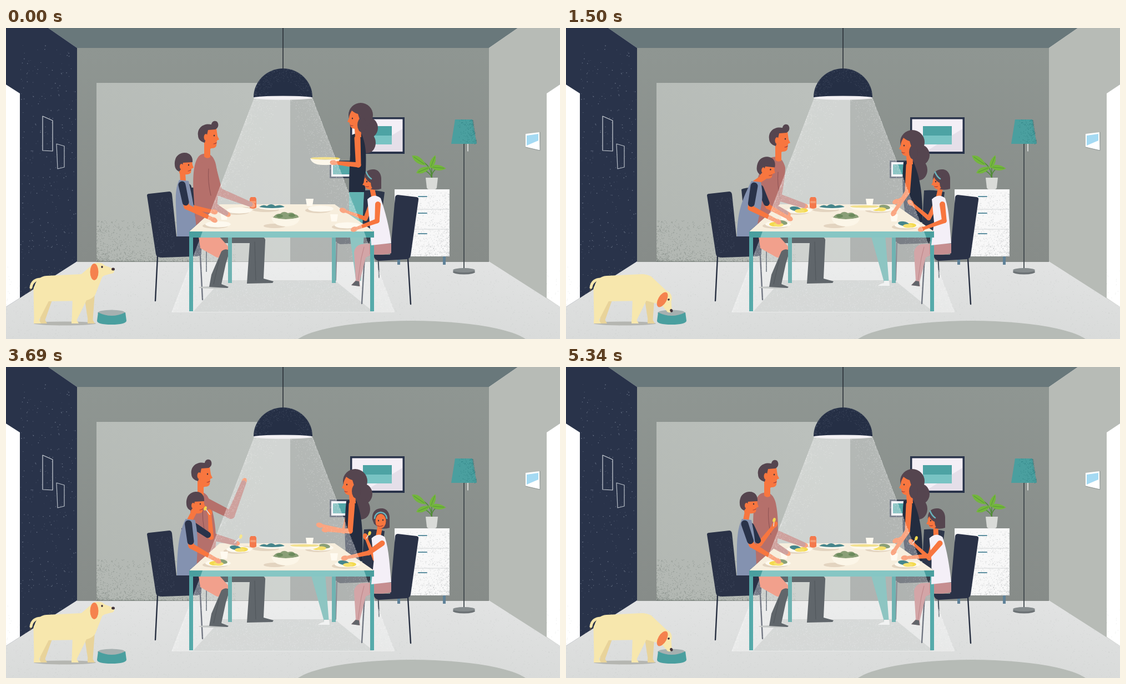
These frames come from a looping animation (998x561 px, 5370 ms). An HTML page with a canvas:

```html
<!DOCTYPE html>
<html lang="en">
<head>
<meta charset="utf-8">
<title>Family dinner</title>
<style>
html, body { margin: 0; width: 100%; height: 100%; overflow: hidden; background: #dcdedd; }
canvas { display: block; width: 998px; height: 561px; }
</style>
</head>
<body>
<canvas id="stage" width="998" height="561"></canvas>
<script>
const W = 998, H = 561, LOOP = 5370, TAU = Math.PI * 2;
const NAVY = '#29334a', TEAL = '#4a9f9f', SKIN = '#f8763f', HAIR = '#55454f', INK = '#40333b';
const CREAM = '#fcf6e8', SHIRT = '#b5706b', GREY = '#60666b', YELLOW = '#f3d94f', DOG = '#f7e7ad';
const stage = document.getElementById('stage').getContext('2d');
let g = stage;

let seed = 7;
const rnd = () => (seed = (seed * 16807) % 2147483647) / 2147483647;

// Drawing helpers
const fill = (d, c) => { g.fillStyle = c; g.fill(new Path2D(d)); };
const line = (d, c, w = 1.5) => {
  g.strokeStyle = c; g.lineWidth = w; g.lineCap = g.lineJoin = 'round';
  g.stroke(new Path2D(d));
};
const rect = (x, y, w, h, c) => { g.fillStyle = c; g.fillRect(x, y, w, h); };
const oval = (x, y, rx, ry, c, rot = 0) => {
  g.fillStyle = c; g.beginPath(); g.ellipse(x, y, rx, ry, rot, 0, TAU); g.fill();
};
const taper = (x1, y1, w1, x2, y2, w2, c) => {
  const a = Math.atan2(y2 - y1, x2 - x1), q = Math.PI / 2;
  g.fillStyle = c; g.beginPath();
  g.arc(x1, y1, w1 / 2, a + q, a + 3 * q);
  g.arc(x2, y2, w2 / 2, a - q, a + q);
  g.fill();
};
const at = (x, y, draw, rot = 0, s = 1) => {
  g.save(); g.translate(x, y); g.rotate(rot); g.scale(s, s); draw(); g.restore();
};
const specks = (n, c, place) => {
  g.fillStyle = c;
  for (let i = 0; i < n; i++) { const [x, y, s = 1] = place(); g.fillRect(x, y, s, s); }
};
const surface = () => {
  const c = document.createElement('canvas');
  c.width = W; c.height = H;
  return c;
};
const paint = (c, draw) => { g = c.getContext('2d'); draw(); g = stage; return c; };
const shade = (x1, y1, x2, y2, a, b) => {
  const s = g.createLinearGradient(x1, y1, x2, y2);
  s.addColorStop(0, a); s.addColorStop(1, b);
  return s;
};

// Motion helpers
const step = (t, a, b) => {
  const p = Math.min(1, Math.max(0, (t - a) / (b - a)));
  return p * p * (3 - 2 * p);
};
const bump = (t, a, b, c, d) => step(t, a, b) - step(t, c, d);
const mix = (p, q, u) => p.map((v, i) => v + (q[i] - v) * u);

function room() {
  rect(0, 0, W, H, shade(0, 421, 0, 561, '#e2e3e3', '#d9dbda'));
  rect(128, 36, 742, 386, shade(0, 36, 0, 421, '#8f9692', '#878c89'));
  fill('M76 0H922L870 36H128Z', '#69787b');
  fill('M0 0H76L128 36V421L0 503Z', NAVY);
  fill('M922 0H998V503L870 421V36Z', '#b7bbb6');
  fill('M0 102L25 118V487L0 503Z', '#fff');
  fill('M998 102L974 118V487L998 503Z', '#fff');
  specks(300, 'rgba(200,210,225,.4)', () => [26 + rnd() * 100, 30 + rnd() * 390, .5 + rnd()]);
  line('M66 159L84 167V222L66 221Z', '#cfd4da', 1.2);
  line('M91 209L105 213V251L93 254Z', '#b9c0c9', 1.2);

  rect(163, 99, 349, 322, shade(163, 421, 420, 100, '#b2b7b2', '#bbc0bc'));
  specks(1500, 'rgba(126,134,129,.7)', () => [163 + rnd() ** 1.6 * 250, 421 - rnd() ** 3 * 75]);
  specks(1500, 'rgba(190,194,193,.4)', () => [rnd() * W, 430 + rnd() * 131]);
  oval(731, 576, 216, 48, '#b6bbb6');

  // wall pictures
  rect(620, 161, 98, 66, NAVY);
  rect(623.5, 164.5, 91, 58.5, '#f4eff6');
  fill('M714 182V223H648Z', '#e5dfe9');
  rect(643, 177, 52, 17, '#4da3a4');
  rect(643, 194, 52, 16, '#78c3c3');
  rect(583, 239, 45, 32, '#3d4759');
  rect(586, 242, 39, 26, '#f1eef4');
  rect(589, 246, 33, 18, '#52a7a7');
  fill('M936 191L961 188L962 221L936 215Z', '#fff');
  line('M962 188V221L936 215', '#8b9290', 1);
  fill('M938 194L959 191V203L938 212Z', '#a5daf3');

  // dresser and plant
  rect(705, 412, 5, 15, '#5f8299');
  rect(787, 412, 5, 15, '#5f8299');
  rect(700, 291, 99, 121, '#f8f8f8');
  specks(900, 'rgba(150,156,158,.4)', () => [799 - rnd() ** 1.7 * 95, 412 - rnd() ** 1.5 * 115]);
  line('M700 327H799M700 363H799', '#d5d7d8', 1);
  for (const y of [304, 334, 371]) line(`M743 ${y}h15`, '#5d8fa0', 2);
  const leaf = (x, y, r, s) => {
    line(`M767 271Q766 ${y + 6} ${x} ${y}`, '#4f8d35', 1.5);
    at(x, y, () => {
      fill('M-14 0Q-4 -10 14 0Q-2 10 -14 0Z', '#74b63d');
      line('M-10 0H10', '#4f9134', .8);
    }, r, s);
  };
  leaf(744, 239, .6, 1.1); leaf(769, 241, -1.2, .9); leaf(779, 252, .1, 1); leaf(752, 256, -.4, 1);
  fill('M756 270H778L776 288Q775 291 772 291H762Q759 291 758 288Z', '#d9dbd8');

  // floor lamp
  line('M825 209V437', '#3f474c', 1.8);
  oval(825, 440, 20, 4.5, '#6c7275');
  oval(825, 437, 20, 4, '#858b8d');
  line('M832 209V222', '#eef0ef', 1.5);
  fill('M809 165H840L848 209H802Z', TEAL);
  specks(160, 'rgba(30,110,115,.5)', () => {
    const y = rnd() * 44; return [841 + y * .15 - rnd() ** 2 * 30, 165 + y];
  });

  // shade below the table
  fill('M388 455H592L662 512H337Z', 'rgba(176,181,180,.62)');
  specks(1300, 'rgba(225,228,227,.5)', () => {
    const y = rnd(); return [388 - y * 51 + rnd() * (204 + y * 121), 455 + y * 57];
  });

  // chairs
  line('M361 400V439M596 388L594 455M669 380L672 450', '#474f5c', 2);
  fill('M316 291Q327 287 340 288L352 385H325Z', '#2c3549');
  fill('M645 293Q662 291 682 296L671 385H640Z', '#2c3549');
  fill('M590 376H655V388L602 390Q592 387 590 376Z', '#363d48');
  line('M273 412L269 492M350 410L354 490M724 416L729 498M646 412L641 497', '#252d3f', 2.4);
  fill('M254 302Q254 299 258 299L294 295Q298 295 299 300L307 376H352V408Q350 412 340 412L282 414Q271 414 270 408Z', '#2a3247');
  fill('M701 305Q702 301 706 301L740 305Q744 306 743 310L729 410Q728 416 722 417L672 420Q664 420 662 409H692Z', '#2a3247');
  specks(160, 'rgba(140,150,170,.3)', () => [268 + rnd() * 35, 305 + rnd() * 100]);
}

function beam() {
  fill('M447 126H552L700 513H298Z', 'rgba(255,255,255,.34)');
  specks(2600, 'rgba(255,255,255,.3)', () => {
    const y = rnd(), w = 52 + y * 149, d = rnd() ** 2.5 * 45;
    return [499.5 + (rnd() < .5 ? -1 : 1) * (w - d), 126 + y * 387];
  });
}

function lampAndLegs() {
  line('M499 0V74', '#2b3038', 1.6);
  fill('M446 125A53 52 0 0 1 552 125Q499 132 446 125Z', '#252f45');
  specks(380, 'rgba(120,130,150,.3)', () => {
    const a = Math.PI * (1 + rnd()), r = 52 - rnd() ** 2 * 24;
    return [499 + Math.cos(a) * r, 124 + Math.sin(a) * r];
  });
  oval(499, 126, 53, 3.6, '#f3f1f4');

  fill('M370 377H460Q468 377 467 385L464 452L482 457L480 460L434 461L439 388L380 388Z', GREY);
  line('M448 386L450 455', '#50565b', 1);
  oval(372, 468, 25, 2, '#c3c6c5');
  fill('M347 377L385 377L401 395Q405 400 396 406Q388 418 378 413L350 397Z', '#f2a08c');
  fill('M388 403Q396 396 403 402L396 425L388 462L401 467L399 469L366 467L370 445Z', GREY);
  line('M384 418L374 462', '#50565b', 1);
}

const DISHES = [[420, 329], [382, 354], [567, 326], [615, 356]];
const cup = (x, y) => fill(`M${x - 7} ${y}H${x + 7}L${x + 5} ${y + 13}H${x - 5}Z`, '#fffaf0');

function table() {
  fill('M660 389L694 389V406Q680 410 660 408L648 414L637 458L638 466L622 464L630 455L627 405Q628 393 640 390Z', '#d3a5a7');
  fill('M655 389L694 389V406Q680 410 655 408Z', '#c68e90');
  line('M645 395L640 415L634 456', '#bd8488', 1);
  fill('M630 456L636 457L637 466L622 464Z', '#62656b');

  rect(400, 376, 7, 84, '#6fb3b2');
  rect(587, 376, 7, 84, '#6fb3b2');
  fill('M385 318H592L663 367H330Z', '#f7eedd');
  rect(330, 367, 333, 11, TEAL);
  fill('M354 367H645L649 378H350Z', '#86c6c4');
  rect(330, 378, 7, 133, '#55aaaa');
  rect(656, 378, 7, 133, '#55aaaa');

  const shadow = '#e3d4c0';
  oval(468, 328, 24, 4, shadow); oval(484, 357, 20, 4, shadow); oval(432, 326, 9, 3, shadow);
  for (const [x, y] of DISHES) {
    oval(x - 5, y + 3, 23, 5, shadow);
    oval(x, y, 23, 5.5, '#fdf9ef');
  }
  oval(479, 324, 24, 4, '#fdf9ef');
  fill('M456 323Q463 317 470 321Q478 315 485 321Q495 317 502 323Q480 327 456 323Z', '#45858b');
  cup(547, 308); cup(393, 333); cup(591, 336);
  oval(504, 341, 26, 4, '#ebe1ce');
  fill('M481 342Q486 334 494 335Q500 329 508 334Q516 331 520 336Q527 337 527 342Q504 348 481 342Z', '#8a9f77');
  oval(493, 339, 6, 3, '#6b8a5c'); oval(515, 338, 6, 3, '#6b8a5c');
  fill('M478 341Q504 349 530 341Q528 357 504 358Q480 357 478 341Z', CREAM);
  fill('M439 308L441 305H449L451 308V324Q445 328 439 324Z', '#f4794c');
  rect(440, 312, 10, 4, '#f69a72');
}

// Two-bone arm: the elbow follows from the lengths and the bend side
function arm(sx, sy, [hx, hy], upper, lower, bend, w, sleeve, cuff) {
  const d = Math.min(Math.hypot(hx - sx, hy - sy), upper + lower - .1);
  const cos = (upper ** 2 + d ** 2 - lower ** 2) / (2 * upper * d);
  const a = Math.atan2(hy - sy, hx - sx) + bend * Math.acos(Math.max(-1, Math.min(1, cos)));
  const ex = sx + Math.cos(a) * upper, ey = sy + Math.sin(a) * upper;
  const f = Math.atan2(hy - ey, hx - ex);
  oval(hx + Math.cos(f) * 3, hy + Math.sin(f) * 3, 6.5, 4.5, SKIN, f);
  taper(ex, ey, w * .85, hx, hy, w * .55, cuff);
  taper(sx, sy, w, ex, ey, w * .85, cuff);
  if (sleeve) taper(sx, sy, w + 1, sx + (ex - sx) * .8, sy + (ey - sy) * .8, w, sleeve);
}
const fork = ([x, y], dx, dy) => {
  line(`M${x} ${y}l${dx} ${dy}`, '#dfe1e0', 1.5);
  oval(x + dx, y + dy, 2.6, 4, YELLOW, .3);
};
const offTable = draw => {
  g.save();
  g.clip(new Path2D('M0 0H998V561H0ZM385 318H592L663 367V378H330V367Z'), 'evenodd');
  draw();
  g.restore();
};
const eye = (x, y) => oval(x, y, 1.2, 1.5, INK);

function man(t) {
  const lean = bump(t, 600, 1500, 2910, 3600), wave = bump(t, 2950, 3600, 4700, 5250);
  const x = 366 + 20 * lean - 12 * wave, y = 192 + 6 * lean - wave;
  const far = mix(mix([440, 318], [427, 320], step(t, 0, 500)), [428, 209], wave);
  const near = mix([396, 334], [412, 317], wave);
  const sx = 360 + (x - 366) * .85, sy = y + 40, m = (sx - 360) * .5;
  arm(sx + 8, sy + 12, far, 53, 62, 1, 17, null, SHIRT);
  offTable(() => fill(`M${sx - 5} ${sy - 5}C${sx - 23} ${sy - 2} ${336 + m} 270 338 300L342 368H372
    C381 335 ${386 + m} 285 ${sx + 18} ${sy + 14}Q${sx + 14} ${sy - 3} ${sx + 2} ${sy - 6}Z`, SHIRT));
  arm(sx - 4, sy + 18, near, 60, 46, 1, 17, null, SHIRT);
  line(`M${sx + 5} ${sy + 22}Q${sx + 3} ${sy + 45} ${sx + 9} ${sy + 70}`, '#8c5152', 1);
  if (wave > .5) fork(near, 11, -11);
  at(x, y, () => {
    fill('M-7 -11H13L15 3L18 9L14 11L13 20Q12 25 4 25L2 26V41Q-4 45 -9 40V8Z', SKIN);
    fill('M-20 2C-22 -13 -9 -21 4 -18C5 -25 12 -26 15 -22C18 -17 16 -11 11 -9L-2 -8L-4 1L-8 15C-16 13 -20 8 -20 2Z', HAIR);
    oval(-6, 5, 3.5, 6, SKIN);
    eye(9, 2);
    line('M8 17Q11 17 13 15', '#a8433a', 1.2);
  });
}

function boy(t) {
  const reach = step(t, 700, 1500), lean = bump(t, 700, 1500, 2910, 3600);
  const up = step(t, 2950, 3600), bite = bump(t, 2950, 3600, 3900, 4600);
  const x = 320 + 40 * lean + 9 * up + 12 * bite, y = 244 + 7 * lean;
  const far = mix(mix(mix([372, 331], [400, 342], reach), [374, 287], up), [367, 266], bite);
  const near = mix([372, 345], [379, 348], reach);
  const sx = 318 + (x - 320) * .55, sy = 277 + (y - 244) * .3;
  arm(sx + 10, sy + 10, far, 36, 41, 1, 11, NAVY, SKIN);
  if (up > .2) fork(far, 1 - 9 * bite, -11);
  taper(sx + 1, sy, 10, x - 2, y + 17, 10, SKIN);
  offTable(() => fill(`M${sx - 6} ${sy - 3}C${sx - 17} ${sy + 20} 308 325 308 376H344
    C342 340 ${sx + 20} ${sy + 40} ${sx + 11} ${sy - 1}Z`, '#8492b0'));
  arm(sx - 1, sy + 6, near, 40, 52, 1, 12, NAVY, SKIN);
  at(x, y, () => {
    fill('M-8 -4L15 -5L16 3L18 8L14 10L13 17Q9 21 2 20L-8 18Z', SKIN);
    fill('M-16 3C-17 -14 -6 -19 2 -19C12 -19 17 -11 16 -2L-1 -1L-3 8L-8 15C-13 13 -16 8 -16 3Z', HAIR);
    oval(-4, 6, 3, 5, SKIN);
    eye(9, 3);
    line('M8 14Q11 14 13 12', '#a8433a', 1.1);
  }, lean * .15);
}

const stoop = t => step(t, 0, 600), sit = t => step(t, 600, 1500);

function woman(t) {
  const down = stoop(t), seated = sit(t), free = step(t, 950, 1500);
  const reach = bump(t, 2300, 2910, 2950, 3600), talk = bump(t, 2950, 3650, 4700, 5300);
  const wide = bump(t, 2950, 3600, 3900, 4600);
  const [hx, hy] = mix(mix([632, 296], [618, 322], down), [627, 350], seated);
  const [px, y] = mix(mix([639, 157], [601, 182], down), [624, 206], seated);
  const x = px - 8 * reach + 5 * talk, sx = x - 5, sy = y + 38;
  const dish = mix(mix([575, 238], [540, 281], down), [538, 325], step(t, 600, 950));
  const hold = [dish[0] + 18, dish[1] + 5];
  const near = mix(mix(hold, [592, 331], free), [578, 294], wide);
  const far = mix(mix(mix(hold, [597, 312], free), [560, 318], reach), [568, 286], talk);
  arm(sx - 2, sy + 6, far, 48, 42, -1, 10, null, SKIN);
  oval(x + 13, y + 23, 18, 19, HAIR);
  oval(x + 11, y + 50, 16, 19, HAIR);
  offTable(() => {
    fill(`M${hx - 14} ${hy - 3}H${hx + 13}L${hx + 10} 362H${hx - 14}Z`, '#62b3b1');
    fill(`M${sx - 11} ${sy - 2}Q${sx - 3} ${sy - 7} ${sx + 7} ${sy - 3}
      C${sx + 18} ${sy + 25} ${hx + 16} ${hy - 55} ${hx + 15} ${hy}H${hx - 14}
      Q${sx - 16} ${sy + 45} ${sx - 11} ${sy - 2}Z`, '#232c3f');
  });
  at(...dish, () => {
    const d = 9 - 5 * step(t, 700, 950);
    fill(`M-27 -3Q0 2 27 -3Q24 ${d} 4 ${d}H-4Q-24 ${d} -27 -3Z`, '#fbf3df');
    oval(0, -3, 26, 2.3, '#ecd054');
  });
  arm(sx - 1, sy + 4, near, 48, 42, -1, 11, null, SKIN);
  at(x, y, () => {
    oval(0, 0, 22, 22, HAIR);
    fill('M-16 -8Q-21 0 -21 6L-24 12L-20 14Q-20 24 -11 25L-10 40H1L0 14L-5 -2Q-10 -3 -16 -8Z', SKIN);
    oval(2, 18, 8, 13, HAIR);
    eye(-15, 6);
    line('M-19 18Q-17 20 -14 19', '#a8433a', 1.1);
  });
}

function girl(t) {
  const lean = bump(t, 600, 1500, 1500, 2910), eat = step(t, 1500, 2910);
  const turn = bump(t, 2950, 3600, 3950, 4600), rest = step(t, 4750, 5340);
  const x = 660 + 16 * lean + 7 * eat + 8 * turn, y = 273;
  const near = mix(mix([630, 362], [643, 362], lean), [613, 344], eat);
  let far = mix(mix([610, 330], [623, 317], lean), [640, 303], eat);
  far = mix(mix(far, [649, 309], turn), [625, 318], rest);
  const sx = 667 + (x - 660) * .5, sy = 306;
  arm(sx - 9, sy + 12, far, 28, 40, -1, 9, null, SKIN);
  if (eat > .8) fork(far, 6, -9);
  taper(sx - 4, sy, 9, x - 1, y + 14, 9, SKIN);
  offTable(() => fill(`M${sx - 16} ${sy + 3}Q${sx - 4} ${sy - 9} ${sx + 8} ${sy + 1}
    C${sx + 16} ${sy + 25} 691 360 694 388L658 392L${sx - 12} ${sy + 44}Z`, '#f4eff7'));
  arm(sx + 3, sy + 12, near, 30, 41, -1, 10, null, SKIN);
  at(x, y, () => {
    const f = -6 + 6 * turn;
    fill('M-15 2C-16 -13 -8 -18 2 -18C12 -18 17 -8 16 2V17Q8 20 -2 18L-12 10Z', HAIR);
    oval(f, 5, 9.5, 13, SKIN);
    if (turn < .5) {
      fill('M-15 5L-18 10L-14 11Z', SKIN);
      fill('M-13 -9Q-2 -14 4 -6L4 17Q-2 19 -3 6Q-9 4 -13 -4Z', HAIR);
      line('M-11 -13Q-8 -5 -2 -1', '#69b5bd', 2.5);
    } else {
      line('M-11 0Q-10 -10 0 -11Q10 -10 11 0', '#69b5bd', 2.5);
      eye(4, 3);
    }
    eye(f - 4, 4);
    line(`M${f - 6} 13Q${f - 2} ${14 + turn * 2} ${f - 1 + turn * 5} 13`, '#9c3a38', 1.2);
  });
}

function dog(t) {
  const eat = bump(t, 0, 540, 1700, 2100) + step(t, 4420, 4980);
  const level = bump(t, 2700, 2910, 3300, 3600), dip = bump(t, 2960, 3080, 3100, 3300);
  const x = 167 + 10 * eat + 11 * level, y = 437 + 50 * eat + 12 * level + 16 * dip;
  const r = (65 * eat + 28 * dip) * Math.PI / 180, swing = eat * (1 - eat);
  const ear = .52 * eat - 1.7 * swing, tail = 44 - 20 * swing - 6 * dip;
  const dark = '#e8d39a';
  oval(106, 533, 56, 3.5, '#b5b6b1');
  line(`M64 453Q${tail + 2} 453 ${tail} 474`, '#5b5148', 2.5);
  line(`M64 453Q${tail + 3} 453 ${tail + 1} 468`, DOG, 5);

  const leg = (hipX, hipY, w, footX, c) => {
    taper(hipX, hipY, w, footX, 526, 9, c);
    fill(`M${footX - 5} 526H${footX + 4}L${footX + 8} 533H${footX - 5}Z`, c);
  };
  leg(150, 478, 20, 152, dark);
  leg(74, 484, 22, 66, dark);
  oval(190, 514, 25, 5.5, '#a6b0b0');
  taper(74, 470, 46, 138, 468, 48, DOG);
  taper(142, 468, 46, x - 3 * Math.cos(r), y, 27, DOG);
  leg(67, 474, 36, 55, DOG);
  leg(136, 474, 32, 123, DOG);
  at(x, y, () => {
    oval(0, 0, 14, 13.5, DOG);
    taper(3, 0, 23, 23, 1, 10, DOG);
    oval(26, -2, 3, 2.5, INK);
    oval(6, -6, 1.7, 1.9, INK);
  }, r);
  oval(x - 8 * Math.cos(r), y + 3, 7.5, 15, '#f5824e', ear);
  fill('M166 513Q190 525 215 513L217 528Q216 535 190 535Q164 535 164 528Z', TEAL);
}

function food(t) {
  DISHES.forEach(([x, y], i) => {
    const s = step(t, 1000 + i * 80, 1150 + i * 80), flip = i % 3 ? 1 : -1;
    const greens = i % 3 ? '#8a9f77' : '#45858b';
    if (s) at(x, y, () => {
      oval(-6 * flip, 0, 10, 4, YELLOW);
      oval(7 * flip, -3, 10, 4, greens, .15);
      oval(1, 1, 9, 3.5, '#f6e06c');
    }, 0, s);
  });
}

function womanLeg(t) {
  const [knee, foot] = mix(mix([632, 634], [577, 605], stoop(t)), [562, 576], sit(t));
  taper(knee, 372, 26, foot + 1, 456, 9, '#8ec5c2');
  fill(`M${foot - 3} 456H${foot + 6}L${foot + 7} 465H${foot - 14}Q${foot - 10} 461 ${foot - 3} 460Z`, '#f1f2f2');
}

const glow = paint(surface(), beam);
const back = paint(surface(), () => { room(); g.drawImage(glow, 0, 0); lampAndLegs(); });
const middle = paint(surface(), table);
const people = surface();

function family(t) {
  g.clearRect(0, 0, W, H);
  for (const person of [man, boy, woman, girl]) person(t);
  // the lamp brightens only what stands in its cone
  g.globalCompositeOperation = 'source-atop';
  g.drawImage(glow, 0, 0);
  g.globalCompositeOperation = 'source-over';
}

function frame(t) {
  g.drawImage(back, 0, 0);
  womanLeg(t);
  g.drawImage(middle, 0, 0);
  food(t);
  paint(people, () => family(t));
  g.drawImage(people, 0, 0);
  dog(t);
}

const start = performance.now();
function tick() {
  frame((performance.now() - start) % LOOP);
  requestAnimationFrame(tick);
}
tick();
</script>
</body>
</html>
```
